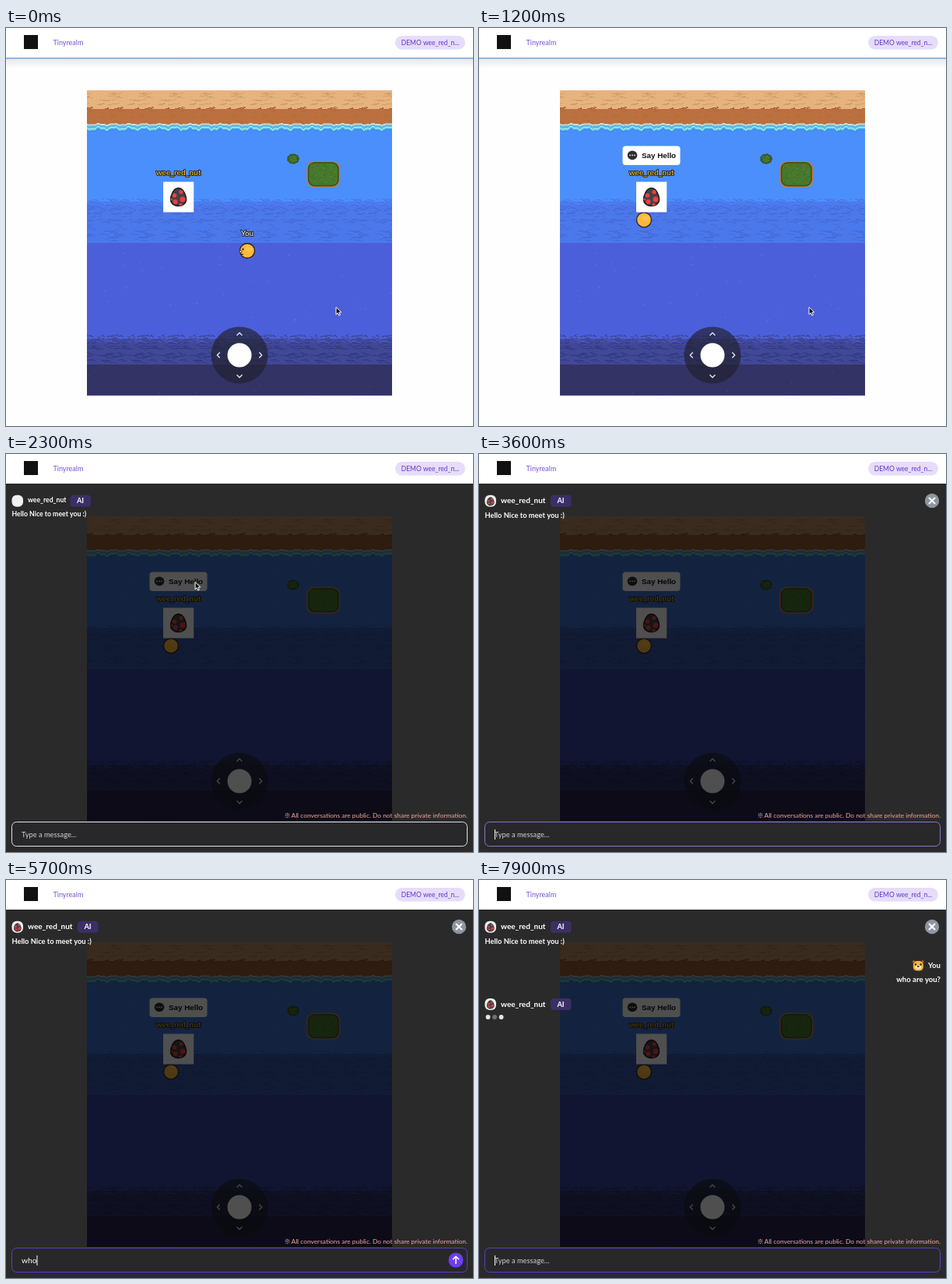
An HTML page with a canvas for the animation above (8 s loop, 600 px wide and 511 px high).

```html
<!DOCTYPE html>
<html lang="en">
<head>
<meta charset="utf-8">
<title>Seaside chat</title>
<style>
html, body { margin: 0; width: 100%; height: 100%; overflow: hidden; background: #fefefe; }
canvas { display: block; }
</style>
</head>
<body>
<canvas id="stage" width="600" height="511"></canvas>
<script>
const LOOP = 8000, CHAT = 2250, LOADED = 2500, FOCUS = 3400, SENT = 7050, REPLY = 7350;
const NAME = 'wee_red_nut', MESSAGE = 'who are you?';
const KEYS = [4650, 5200, 5600, 5800, 5950, 6080, 6200, 6320, 6430, 6540, 6650, 6780];
const FACE = 'Lato, "Open Sans", sans-serif';
const LEFT = 104, TOP = 80, SIZE = 392, TILE = 39.2;

const stage = document.getElementById('stage').getContext('2d');
const map = document.createElement('canvas');
map.width = 600;
map.height = 511;
let c = map.getContext('2d');

let seed = 7;
const rand = () => (seed = (seed * 16807) % 2147483647) / 2147483647;
const clamp = v => Math.max(0, Math.min(1, v));
const span = (t, a, b) => clamp((t - a) / (b - a));
const ease = v => v * v * (3 - 2 * v);
const mix = (a, b, v) => a + (b - a) * v;

function rect(x, y, w, h, fill) {
  c.fillStyle = fill;
  c.fillRect(x, y, w, h);
}

function round(x, y, w, h, r, fill, stroke, width = 1) {
  c.beginPath();
  c.roundRect(x, y, w, h, r);
  paint(fill, stroke, width);
}

function oval(x, y, rx, ry, fill, stroke, width = 1) {
  c.beginPath();
  c.ellipse(x, y, rx, ry, 0, 0, 7);
  paint(fill, stroke, width);
}

function line(points, color, width) {
  c.beginPath();
  points.forEach(([x, y]) => c.lineTo(x, y));
  paint(null, color, width);
}

function paint(fill, stroke, width) {
  if (fill) { c.fillStyle = fill; c.fill(); }
  if (stroke) { c.strokeStyle = stroke; c.lineWidth = width; c.stroke(); }
}

function text(s, x, y, font, color, align = 'left', outline) {
  c.font = font.includes(',') ? font : `${font} ${FACE}`;
  c.textAlign = align;
  if (outline) {
    c.strokeStyle = outline;
    c.lineWidth = 2;
    c.lineJoin = 'round';
    c.strokeText(s, x, y);
  }
  c.fillStyle = color;
  c.fillText(s, x, y);
}

// Short stepped dashes, repeated once per tile
function ripples(y0, y1, count, color, longest) {
  for (let i = 0; i < count; i++) {
    const x = Math.floor(rand() * TILE), y = Math.floor(mix(y0, y1, rand()));
    const w = Math.round(2 + rand() * longest), step = rand() < .5 ? -1 : 1;
    for (let k = -1; k < 10; k++) {
      const left = LEFT + Math.round(k * TILE) + x;
      rect(left, y, w, 1, color);
      rect(left + w, y + step, Math.ceil(w * .4), 1, color);
    }
  }
}

function specks(y0, y1, count, color) {
  for (let i = 0; i < count; i++) {
    rect(LEFT + Math.floor(rand() * SIZE), Math.floor(mix(y0, y1, rand())), 1, 1, color);
  }
}

function drawMap() {
  c.save();
  c.beginPath();
  c.rect(LEFT, TOP, SIZE, 391.5);
  c.clip();
  const bands = [[80, '#e6b37f'], [104, '#bb7040'], [125, '#4b8ffd'], [223, '#4b78ea'],
    [276, '#4c5fdb'], [399, '#404898'], [432, '#343366']];
  bands.forEach(([y, color]) => rect(LEFT, y, SIZE, 472 - y, color));
  for (const y of [83, 87, 92, 97]) ripples(y, y + 2, 4, '#d39d69', 8);
  ripples(102, 105, 7, '#a9602f', 4);
  ripples(106, 121, 5, '#b4683a', 5);
  ripples(219, 224, 16, '#4b78ea', 4);
  ripples(224, 229, 8, '#4b86f6', 4);
  ripples(227, 274, 50, '#466bd9', 7);
  ripples(394, 400, 16, '#404898', 4);
  ripples(399, 404, 8, '#4a58bd', 4);
  ripples(403, 431, 36, '#34397f', 7);
  specks(135, 218, 10, '#65a2ff');
  specks(280, 392, 28, '#6d80ee');
  specks(436, 470, 18, '#494b87');
  // Surf
  for (let x = 0; x < SIZE; x++) {
    const h = Math.round(1.3 * Math.sin(x / TILE * 4 * Math.PI) + Math.sin(x * .8) * .7);
    rect(LEFT + x, 123 + h * .5, 1, 2, '#cfdcda');
    rect(LEFT + x, 125 + h * .5, 1, 6 + h * .5, '#55bfe8');
    rect(LEFT + x, 128 + h, 1, 1, '#c8eef8');
    rect(LEFT + x, 131 + h, 1, 1, '#3d80e6');
  }
  c.restore();
}

function drawIslands() {
  seed = 99;
  for (let i = 0; i < 9; i++) {
    const a = i * .7;
    oval(369 + Math.cos(a) * 5, 168 + Math.sin(a) * 4, 2.6, 2.3, '#3d6b2b', '#2c4624', .8);
  }
  oval(369, 168, 5, 4, '#426f2b');
  round(387, 171.5, 41.5, 32.5, 9, '#47782c', '#c77845', 1.6);
  round(388.6, 173, 38.3, 29.5, 8, null, '#394f28', 1.4);
  for (let i = 0; i < 90; i++) {
    rect(391 + Math.floor(rand() * 33), 175 + Math.floor(rand() * 25), 1.5, 1, i % 2 ? '#3c6927' : '#528536');
  }
  for (let i = 0; i < 12; i++) {
    rect(364 + Math.floor(rand() * 10), 164 + Math.floor(rand() * 8), 1, 1, '#638b38');
  }
}

function egg(x, y, s) {
  c.save();
  c.translate(x, y);
  c.scale(s, s);
  c.beginPath();
  c.moveTo(0, -11.5);
  c.bezierCurveTo(7, -11.5, 10, -1, 10, 3);
  c.bezierCurveTo(10, 14.5, -10, 14.5, -10, 3);
  c.bezierCurveTo(-10, -1, -7, -11.5, 0, -11.5);
  paint('#43424a', '#17161a', 1.4);
  c.clip();
  for (const [dx, dy, r] of [[-5, -2, 2.8], [3.5, -6.5, 2.6], [5.5, 3, 3.6], [-4, 6, 3], [3, 10, 2], [-9, 3, 1.6]]) {
    oval(dx, dy, r, r, '#f0403e');
  }
  c.restore();
}

function drawPlayer(t) {
  const left = span(t, 200, 760), up = span(t, 800, 1040);
  const x = mix(310, 212, left), y = mix(286, 246.3, up);
  text('You', x, y - 19, '9.8px', '#fff', 'center', '#222');
  oval(x, y, 9.5, 9.5, '#fcb83c', '#2b2118', 1.3);
  oval(x + 2, y - 3, 5, 4, '#ffc24c');
  if (t < 780) {
    oval(x - 5.5, y - 2, 1, 1.3, '#241a12');
    oval(x - 8.5, y + 1, 1.7, 1.5, '#f5e0b6', '#241a12', .8);
    rect(x - 8, y + 4, 3, 1, '#241a12');
  }
}

function drawHello() {
  round(184.5, 151.5, 74, 24.5, 4, '#fff');
  oval(197, 163.3, 6.3, 5.9, '#2d2d32');
  for (const dx of [-3, 0, 3]) oval(197 + dx, 163.3, .9, .9, '#fff');
  text('Say Hello', 209, 167, 'bold 9.8px "Liberation Sans", Arial, sans-serif', '#111');
}

function drawPad() {
  oval(300, 420, 36.5, 36.5, 'rgba(32,32,44,.66)');
  oval(300, 420, 15.5, 15.5, '#fff');
  for (let i = 0; i < 4; i++) {
    c.save();
    c.translate(300, 420);
    c.rotate(i * Math.PI / 2);
    line([[-3.5, -25.3], [0, -28.7], [3.5, -25.3]], '#e6e8f2', 1.3);
    c.restore();
  }
}

function drawGame(t) {
  c.drawImage(map, 0, 0);
  if (t >= CHAT) {
    rect(LEFT, TOP, SIZE, 143, 'rgba(0,0,0,.2)');
    rect(LEFT, 223, SIZE, 248.5, 'rgba(0,0,0,.28)');
  }
  drawIslands();
  drawPlayer(t);
  rect(202, 197.5, 39.2, 39, '#fff');
  egg(221.5, 217, 1);
  text(NAME, 221.5, 188.5, '10.2px', '#f6c944', 'center', '#2c2418');
  if (t >= 1060) drawHello();
  drawPad();
}

function drawHeader(chat) {
  if (!chat) {
    const shade = c.createLinearGradient(0, 39, 0, 52);
    shade.addColorStop(0, 'rgba(60,70,100,.12)');
    shade.addColorStop(1, 'rgba(60,70,100,0)');
    rect(0, 39, 600, 13, shade);
  }
  rect(0, 0, 600, 38, '#fff');
  if (!chat) rect(0, 38, 600, 1.5, '#7ba3e6');
  rect(23, 9, 18, 18, '#111');
  text('Tinyrealm', 60.5, 22, '9px', '#7752d8');
  round(500, 10, 90, 17.5, 8.75, '#e7dcfb');
  text('DEMO wee_red_n...', 545, 21.7, '8.5px', '#5f38cb', 'center');
}

function drawSpeaker(y, loaded) {
  round(7.5, y - 7.5, 14.5, 15, 6, '#f0f0f0');
  if (loaded) egg(14.8, y + .5, .45);
  const shift = loaded ? 0 : -9.5;
  text(NAME, 28, y + (loaded ? 3 : 2), loaded ? 'bold 10px' : 'bold 8.6px', '#fff');
  round(92 + shift, y - 7.5, 26.5, 15, 4, '#3c2f66');
  text('AI', 105 + shift, y + 3, 'bold 9.3px', '#fff', 'center');
}

function drawInput(t) {
  const focus = span(t, FOCUS, FOCUS + 300);
  const tone = [[225, 92], [225, 62], [225, 190]].map(([a, b]) => mix(a, b, focus));
  round(7.5, 472.5, 585, 31, 6, '#28282a', `rgb(${tone})`);
  const count = t < SENT ? KEYS.filter(k => k <= t).length : 0;
  const typed = MESSAGE.slice(0, count);
  let caret = 20.5;
  if (count) {
    text(typed, 20, 492, '10.2px', '#fff');
    caret += c.measureText(typed).width;
    oval(578, 488, 9.5, 9.5, '#6d3df0');
    line([[578, 493], [578, 483.5]], '#fff', 1.6);
    line([[574, 487.3], [578, 483.3], [582, 487.3]], '#fff', 1.6);
  } else {
    text('Type a message...', 20, 492, '9.3px', '#d2d2d2');
  }
  const last = t >= SENT ? SENT + 400 : count ? KEYS[count - 1] : FOCUS;
  if (t >= FOCUS && (t < last || (t - last) % 1000 < 600)) rect(caret - .5, 482, 1, 13, '#fff');
}

function drawReply(t) {
  text('You', 593, 113, 'bold 9.6px', '#fff', 'right');
  for (const dx of [-5.5, 5.5]) oval(564.3 + dx, 105, 2, 2, '#e99a2d', '#2b2118', .8);
  round(557.3, 103.5, 14, 13.5, 5.5, '#f9b33c', '#2b2118', .9);
  oval(564.3, 112, 4, 2.7, '#f7e3c0');
  oval(561, 108.5, 1.1, 1.2, '#241a12');
  oval(567.6, 108.5, 1.1, 1.2, '#241a12');
  oval(564.3, 111, 1.3, .9, '#241a12');
  text(MESSAGE, 593, 131, 'bold 9.6px', '#fff', 'right');
  if (t < REPLY) return;
  drawSpeaker(159.5, true);
  const dim = Math.floor((t - REPLY) / 200) % 3;
  [2, 0, 1].forEach((order, i) => {
    oval(11.6 + i * 8.5, 176, 2.9, 2.9, order === (dim + 1) % 3 ? '#727272' : '#e4e4e4');
  });
}

function drawChat(t) {
  const loaded = t >= LOADED;
  drawSpeaker(60.3, loaded);
  text('Hello Nice to meet you :)', 7.5, loaded ? 81.5 : 80.3, loaded ? 'bold 9.3px' : 'bold 8.7px', '#fff');
  if (loaded) {
    oval(582, 60, 9.2, 9.2, '#8e94a2');
    line([[578, 56], [586, 64]], '#fff', 2.1);
    line([[586, 56], [578, 64]], '#fff', 2.1);
  }
  if (t >= SENT) drawReply(t);
  const note = 'All conversations are public. Do not share private information.';
  text(note, 593, 466.6, '8.4px', '#f3aa9d', 'right');
  text('※', 593 - c.measureText(note).width - 1, 466.6, '8px "Noto Sans CJK JP", "Noto Sans CJK", sans-serif', '#f2dcd8', 'right');
  drawInput(t);
}

function drawCursor(t) {
  if (t >= FOCUS) return;
  const go = ease(span(t, 1350, 2050)), leave = ease(span(t, 2750, 3350));
  const x = mix(mix(424, 243, go), 130, leave), y = mix(mix(358.5, 164.5, go), 486, leave);
  c.beginPath();
  for (const [dx, dy] of [[0, 0], [0, 9.2], [2.2, 7.3], [3.8, 10.6], [5.4, 9.8], [3.9, 6.6], [6.8, 6.4]]) {
    c.lineTo(x + dx, y + dy);
  }
  c.closePath();
  paint('#111', '#fff', 1);
}

function draw(now) {
  const t = now % LOOP, chat = t >= CHAT;
  rect(0, 0, 600, 511, '#fefefe');
  drawGame(t);
  if (chat) {
    rect(LEFT, TOP, SIZE, 391.5, 'rgba(0,0,0,.69)');
    rect(0, 38, 600, 42, '#2a2a2a');
    rect(0, 80, LEFT, 431, '#2a2a2a');
    rect(LEFT + SIZE, 80, LEFT, 431, '#2a2a2a');
    rect(LEFT, 471.5, SIZE, 40, '#2a2a2a');
  }
  drawHeader(chat);
  if (chat) drawChat(t);
  drawCursor(t);
  requestAnimationFrame(draw);
}

drawMap();
c = stage;
requestAnimationFrame(draw);
</script>
</body>
</html>
```
